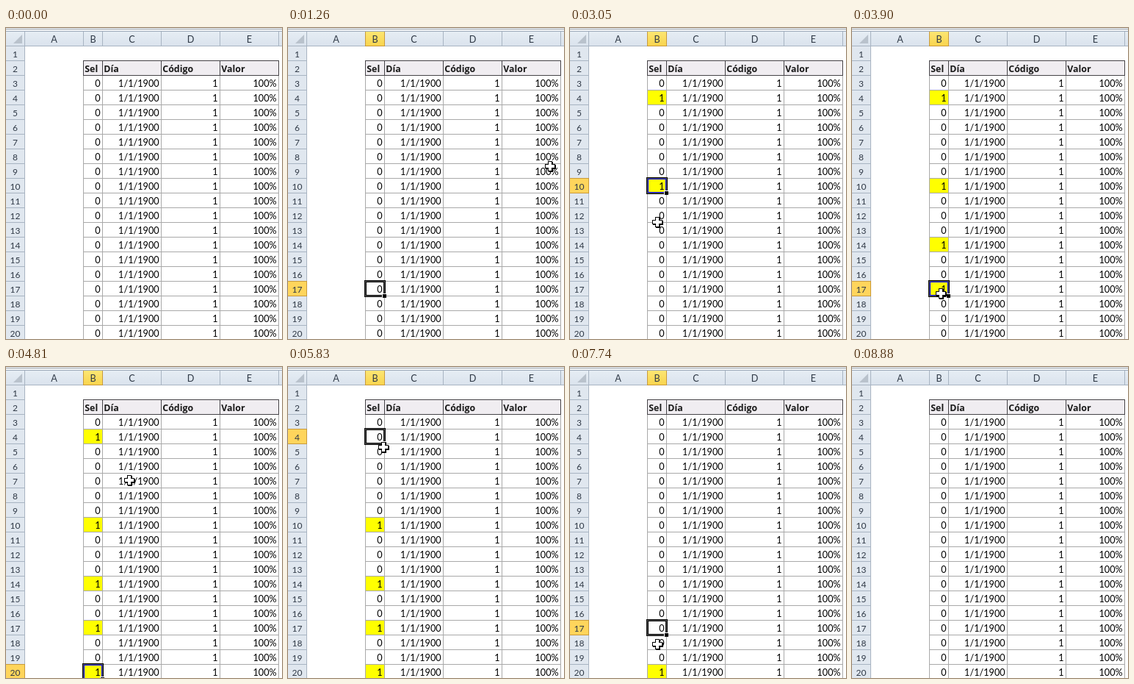
Recreate the animation shown at these times as an HTML page with a canvas. Size 376 by 423 pixels, loop 9.08 s.

```html
<!DOCTYPE html>
<html lang="es">
<head>
<meta charset="utf-8">
<title>Hoja de cálculo</title>
<style>
  html, body { margin: 0; width: 100%; height: 100%; overflow: hidden; background: #fff; }
  canvas { display: block; width: 376px; height: 423px; }
</style>
</head>
<body>
<canvas></canvas>
<script>
const W = 376, H = 423, LOOP = 9080, STEP = 60, CLEAR = 8880;
const ROW = 20, TOP = 24;
const edges = [25, 105, 131, 211, 291, 371];
const titles = ['Sel', 'Día', 'Código', 'Valor'];
const cellFont = '12.7px Lato, "Open Sans", sans-serif';
const rowFont = '12px Lato, "Open Sans", sans-serif';
const titleFont = '700 12.4px "Open Sans", "Noto Sans", sans-serif';

// [time, selected row, cell value]
const clicks = [
  [1200, 17, 0], [2070, 4, 1], [2750, 10, 1], [3290, 14, 1], [3900, 17, 1], [4330, 20, 1],
  [5700, 4, 0], [6450, 10, 0], [7070, 14, 0], [7560, 17, 0], [8280, 20, 0]
];

const ease = {
  both: p => p < .5 ? 2 * p * p : 1 - 2 * (1 - p) ** 2,
  in: p => p * p,
  out: p => 1 - (1 - p) ** 2
};

// [time, x, y, easing towards this point]
const path = [
  [1200, 361, 190], [1870, 121, 88, 'both'], [2070, 121, 88],
  [2550, 121, 214, 'both'], [2750, 121, 214], [3050, 119, 264, 'in'],
  [3230, 120, 296, 'out'], [3290, 120, 296], [3770, 121, 361, 'both'], [3900, 121, 361],
  [4200, 120, 412, 'both'], [4330, 120, 412], [4750, 171, 279, 'in'], [4810, 168, 154],
  [5300, 131, 97, 'out'], [5700, 131, 97], [6250, 118, 215, 'both'], [6450, 118, 215],
  [6570, 100, 288, 'in'], [6870, 118, 302, 'out'], [7070, 118, 302],
  [7430, 121, 357, 'both'], [7560, 121, 357], [7740, 119, 377, 'in'],
  [7920, 120, 404, 'out'], [8220, 119, 412, 'out'], [CLEAR, 119, 412]
];

const canvas = document.querySelector('canvas');
const ctx = canvas.getContext('2d');
const scale = window.devicePixelRatio || 1;
canvas.width = W * scale;
canvas.height = H * scale;
ctx.scale(scale, scale);

const rowTop = r => TOP + (r - 1) * ROW;

function fill(color, x, y, w, h) {
  ctx.fillStyle = color;
  ctx.fillRect(x, y, w, h);
}

function text(str, x, y, align, font, color) {
  ctx.font = font;
  ctx.textAlign = align;
  ctx.fillStyle = color;
  ctx.fillText(str, x, y);
}

function vertical(from, to, y, h) {
  const g = ctx.createLinearGradient(0, y, 0, y + h);
  g.addColorStop(0, from);
  g.addColorStop(1, to);
  return g;
}

function drawHeaders(selected) {
  const line = '#a8b4c2', ink = '#303a47';
  fill('#f1f3f5', 0, 0, W, 4);
  fill('#a0a7b0', 0, 1, W, 1);
  fill('#9eabbb', 0, 4, W, 1);
  fill(vertical('#e6edf4', '#dae3ed', 5, 19), 0, 5, W, 19);
  fill('#e0e7ef', 0, TOP, 25, H);

  ctx.fillStyle = '#b9c2cc';
  ctx.beginPath();
  ctx.moveTo(22, 9);
  ctx.lineTo(22, 21);
  ctx.lineTo(10, 21);
  ctx.fill();

  if (selected) {
    fill(vertical('#fde673', '#f8d44e', 5, 19), 106, 5, 25, 19);
    fill('#ffd55c', 0, rowTop(selected) + 1, 25, ROW - 1);
  }
  fill(line, 0, TOP, W, 1);
  fill(line, 25, 5, 1, H);
  edges.forEach((x, i) => {
    fill(line, x, 5, 1, 19);
    if (i < 5) text('ABCDE'[i], (x + edges[i + 1] + 1) / 2, 20, 'center', cellFont, ink);
  });
  for (let r = 1; r <= 20; r++) {
    fill(line, 0, rowTop(r) + ROW, 25, 1);
    text(r, 12.5, rowTop(r) + 16, 'center', rowFont, ink);
  }
  if (selected) {
    const y = rowTop(selected), gold = '#c99a3c';
    fill(gold, 105, TOP, 27, 1);
    fill(gold, 105, 5, 1, 19);
    fill(gold, 131, 5, 1, 19);
    fill(gold, 0, y, 26, 1);
    fill(gold, 0, y + ROW, 26, 1);
    fill(gold, 25, y, 1, ROW);
  }
}

function drawTable(values) {
  const grid = '#a9a9a9', dark = '#454347';
  fill('#f0edf1', 105, 44, 267, ROW);
  for (let r = 3; r <= 20; r++) {
    const y = rowTop(r), value = values[r] || 0;
    if (value) fill('#ff0', 106, y + 1, 25, ROW - 1);
    fill(grid, 105, y + ROW, 267, 1);
    [value, '1/1/1900', '1', '100%'].forEach((s, i) =>
      text(s, edges[i + 2] - 2.3, y + 16, 'right', cellFont, '#000'));
  }
  edges.slice(1).forEach((x, i) => {
    fill(grid, x, 65, 1, H);
    fill(dark, x, 44, 1, 21);
    if (i < 4) text(titles[i], x + 2.3, 60, 'left', titleFont, '#1a1a1a');
  });
  fill(dark, 105, 44, 267, 1);
  fill(dark, 105, 64, 267, 1);
}

// The border inverts what lies under it: sheet, grid line, cell.
function drawSelection(row, value) {
  const y = rowTop(row);
  ctx.lineWidth = 1;
  ['#000', '#565656', value ? '#00f' : '#000'].forEach((color, i) => {
    ctx.strokeStyle = color;
    ctx.strokeRect(103.5 + i + 1, y - .5 + i, 28 - 2 * i, ROW + 2 - 2 * i);
  });
  fill('#fff', 128, y + 17, 6, 6);
  fill('#000', 129, y + 18, 5, 5);
}

function cross(x, y, reach, half, color) {
  fill(color, x - reach, y - half, reach * 2, half * 2);
  fill(color, x - half, y - reach, half * 2, reach * 2);
}

function drawCursor(x, y) {
  cross(x + 1, y + 1, 7, 3, '#000');
  cross(x, y, 7, 3, '#000');
  cross(x, y, 6, 2, '#fff');
}

function cursorAt(t) {
  const i = path.findIndex(k => k[0] > t);
  const [t0, x0, y0] = path[i - 1], [t1, x1, y1, kind] = path[i];
  if (!kind) return [x0, y0];
  const steps = Math.floor((t1 - t0) / STEP);
  const p = ease[kind](Math.min(1, Math.floor((t - t0) / STEP) / steps));
  return [Math.round(x0 + (x1 - x0) * p), Math.round(y0 + (y1 - y0) * p)];
}

function draw(t) {
  const active = t >= 1200 && t < CLEAR;
  const values = {};
  let selected = 0;
  if (active) {
    for (const [time, row, value] of clicks) {
      if (time > t) break;
      selected = row;
      values[row] = value;
    }
  }
  fill('#fff', 0, 0, W, H);
  drawHeaders(selected);
  drawTable(values);
  if (active) {
    drawSelection(selected, values[selected]);
    drawCursor(...cursorAt(t));
  }
}

const start = performance.now();
function tick() {
  draw((performance.now() - start) % LOOP);
  requestAnimationFrame(tick);
}
tick();
</script>
</body>
</html>
```
